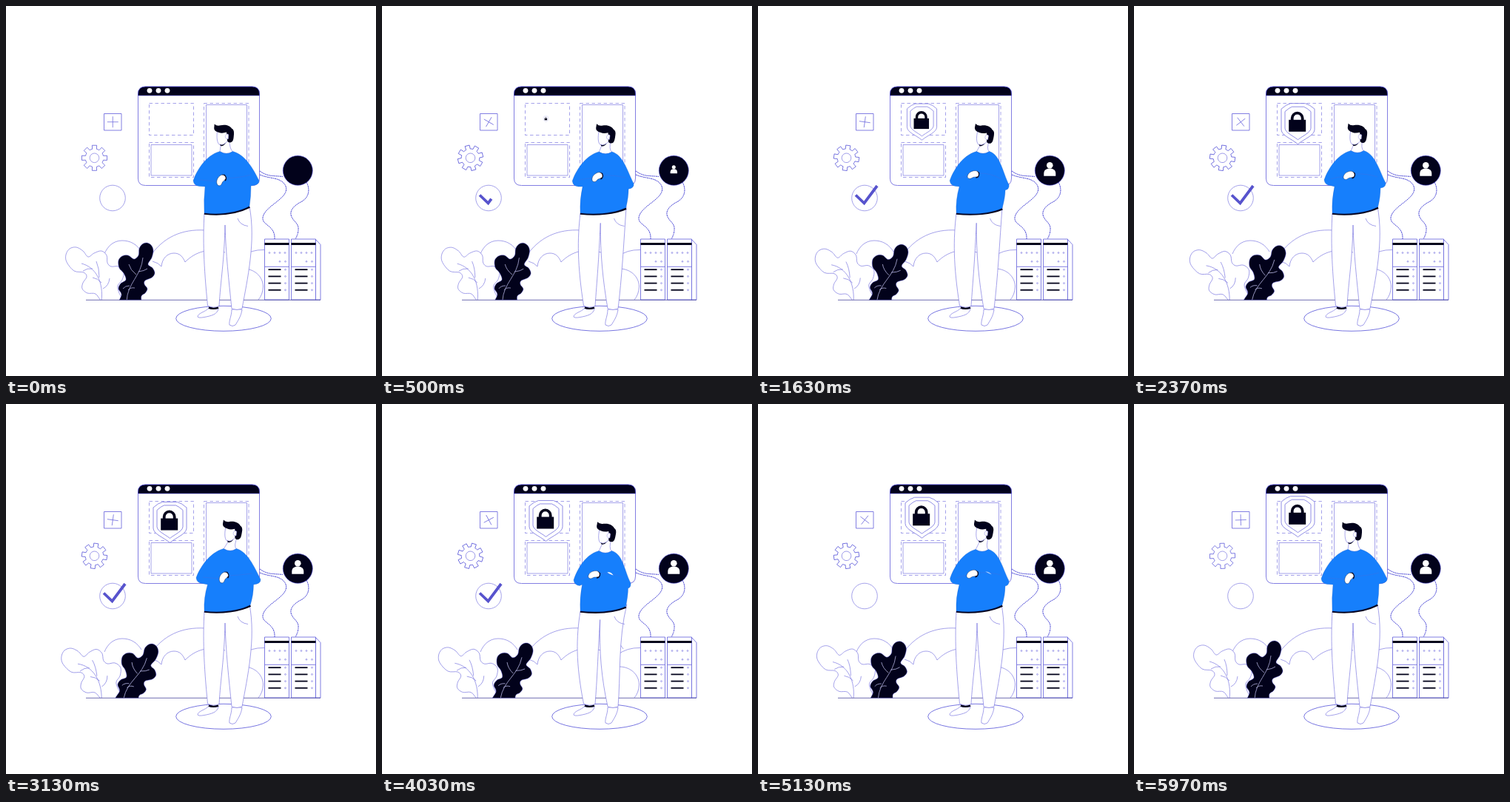
An HTML page with a canvas for the animation above (6 s loop, 500 px wide and 500 px high).

```html
<!DOCTYPE html>
<html lang="en">
<head>
<meta charset="utf-8">
<title>Secure server</title>
<style>
html, body { margin: 0; width: 100%; height: 100%; overflow: hidden; background: #fff; }
canvas { display: block; width: 100%; height: 100%; }
</style>
</head>
<body>
<canvas id="stage"></canvas>
<script>
const LOOP = 6000, TAU = Math.PI * 2;
const INK = '#02021b', LINE = '#7470df', WIRE = '#4a47d6', BLUE = '#167ffc', WHITE = '#fff';
const canvas = document.getElementById('stage');
const ctx = canvas.getContext('2d');
const ratio = window.devicePixelRatio || 1;
canvas.width = canvas.height = 500 * ratio;

const clamp = v => Math.max(0, Math.min(1, v));
const smooth = v => { v = clamp(v); return v * v * (3 - 2 * v); };
const span = (t, a, b) => clamp((t - a) / (b - a));

// Body pose: one value per time, the last returns to the first.
const TIMES = [0, 970, 2370, 3130, 4030, 5130, LOOP];
const POSE = {
  headX: [0, 14, 7, 11, 8, 10],
  headY: [0, 1, 0, -2, 1, -2],
  tilt: [0, .13, .06, .08, .1, .08],
  neck: [0, 8, 4, 5, 4, 5],
  neckY: [0, 1, -1, -1, 2, 0],
  leftX: [253, 261, 257, 257, 259, 259.5],
  leftY: [238, 239, 237, 237, 240, 238],
  rightX: [342, 338.5, 340, 344, 336, 339],
  rightY: [237, 245, 240, 238, 243, 240],
  side: [0, 4, 2, 3.5, 1.5, 3],
  hem: [0, 4, 1, 1, 3, 1],
  handX: [291, 291.5, 291, 294.5, 287, 290],
  handY: [235, 227.5, 229, 234, 231, 230],
  turn: [-.6, .1, 0, -.6, .1, 0],
  cuff: [0, 0, 0, 0, 1, .6],
  legs: [0, 1, 0, 0, .9, 0]
};

function poseAt(t) {
  let i = 0;
  while (i < TIMES.length - 2 && t >= TIMES[i + 1]) i++;
  const k = smooth(span(t, TIMES[i], TIMES[i + 1]));
  const pose = {};
  for (const name in POSE) {
    const v = POSE[name];
    pose[name] = v[i] + (v[(i + 1) % v.length] - v[i]) * k;
  }
  return pose;
}

function paint(path, fill, stroke, width = .65) {
  if (typeof path === 'string') path = new Path2D(path);
  if (fill) { ctx.fillStyle = fill; ctx.fill(path); }
  if (stroke) { ctx.strokeStyle = stroke; ctx.lineWidth = width; ctx.stroke(path); }
}

function circle(x, y, r, fill, stroke, width) {
  const p = new Path2D();
  p.arc(x, y, r, 0, TAU);
  paint(p, fill, stroke, width);
}

function box(x, y, w, h, fill, stroke, width) {
  const p = new Path2D();
  p.rect(x, y, w, h);
  paint(p, fill, stroke, width);
}

function dashed(draw, ...pattern) {
  ctx.setLineDash(pattern);
  draw();
  ctx.setLineDash([]);
}

function at(x, y, angle, scale, draw) {
  ctx.save();
  ctx.translate(x, y);
  ctx.rotate(angle);
  ctx.scale(scale, scale);
  draw();
  ctx.restore();
}

// Closed smooth curve through flat x, y pairs.
function blob(v) {
  const n = v.length / 2, p = new Path2D();
  const pt = i => { i = (i + n) % n; return [v[2 * i], v[2 * i + 1]]; };
  p.moveTo(v[0], v[1]);
  for (let i = 0; i < n; i++) {
    const [a, b, c, d] = [pt(i - 1), pt(i), pt(i + 1), pt(i + 2)];
    p.bezierCurveTo(b[0] + (c[0] - a[0]) / 6, b[1] + (c[1] - a[1]) / 6,
      c[0] - (d[0] - b[0]) / 6, c[1] - (d[1] - b[1]) / 6, c[0], c[1]);
  }
  return p;
}

const paleLeaf = blob([82, 346, 81, 336, 86, 328, 95, 326, 104, 331, 111, 339, 119, 334, 129, 331,
  136, 337, 137, 347, 142, 352, 152, 352, 159, 359, 157, 370, 151, 378, 153, 388, 158, 400,
  140, 406, 129, 399, 121, 389, 110, 388, 103, 382, 104, 374, 109, 366, 105, 360, 92, 358]);
const darkLeaf = blob([180, 328, 184, 322, 190, 320, 196, 323, 199, 330, 197, 340, 192, 349, 198, 354,
  201, 361, 197, 367, 188, 371, 187, 376, 191, 382, 188, 388, 183, 392, 180, 404,
  153, 404, 156, 390, 152, 382, 155, 375, 162, 370, 159, 361, 153, 354, 152, 344, 157, 338,
  165, 337, 173, 342, 179, 337]);
const gear = (() => {
  const p = new Path2D(), inner = 12.3, outer = 17.3;
  const put = (r, a) => p.lineTo(r * Math.cos(a), r * Math.sin(a));
  for (let i = 0; i < 8; i++) {
    const a = i * TAU / 8;
    put(inner, a - .24); put(outer, a - .18); put(outer, a + .18); put(inner, a + .24);
    p.arc(0, 0, inner, a + .24, a + TAU / 8 - .24);
  }
  p.closePath();
  return p;
})();

function clouds() {
  paint('M133 335C137 325 145 317 157 317C168 317 177 322 183 332', null, LINE);
  paint('M195 338C212 313 237 301 269 303C300 304 318 318 326 331', null, LINE);
  paint('M198 345Q206 347 210 352C211 341 218 334 227 334C235 334 239 339 242 346C257 331 275 327 296 333', null, LINE);
  paint('M318 339Q331 329 349 329.5', null, LINE);
  paint('M318 355C335 354 347 365 347.5 379Q347 390 341 397', null, LINE);
}

function browserWindow() {
  paint('M178.5 233V119Q178.5 109 188.5 109H332.5Q342.5 109 342.5 119V233Q342.5 242.5 332.5 242.5H188.5Q178.5 242.5 178.5 233Z', WHITE, LINE, .9);
  paint('M178.5 121V119Q178.5 109 188.5 109H332.5Q342.5 109 342.5 119V121Z', INK, WIRE, .6);
  for (const x of [194, 206, 218]) circle(x, 114.3, 3.4, WHITE);
  dashed(() => {
    box(193.5, 131.5, 60, 43, null, LINE);
    box(193.5, 184.5, 60, 47, null, LINE);
    box(267.5, 131.5, 60.5, 100, null, LINE);
  }, 4.5, 3.5);
  box(196, 187.5, 55, 41.5, null, LINE);
  box(270.5, 133.5, 55, 95.5, null, LINE);
}

function shield(t, wave) {
  at(221.5, 152.2 + 7.8 * wave, 0, smooth(t / 2050), () => {
    paint('M-10 -27.5H10Q16 -26 22.5 -20V8C22 16 9 20 0 27.5C-9 20 -22 16 -22.5 8V-20Q-16 -26 -10 -27.5Z', WHITE, LINE, .8);
    paint('M-8 -23H8Q12 -21.5 17.5 -16.5V6C17 12 7 16 0 21.5C-7 16 -17 12 -17.5 6V-16.5Q-12 -21.5 -8 -23Z', WHITE, LINE, .8);
    paint('M-7.8 -4V-7.5A7 7 0 0 1 6.2 -7.5V-4', null, INK, 3.8);
    box(-12.3, -5.4, 23, 16, INK);
  });
}

function icons(t) {
  const spin = t / LOOP * TAU;
  box(132.5, 145.5, 23.5, 22.5, WHITE, LINE, .9);
  at(144.3, 156.7, spin, 1, () => paint('M-7.5 0H7.5M0 -7.5V7.5', null, LINE, .8));
  at(119.5, 205.3, spin, 1, () => {
    paint(gear, WHITE, WIRE, .7);
    circle(0, 0, 6.3, null, LINE);
  });
  circle(144, 259.5, 17.3, WHITE, LINE);
  const shown = smooth(span(t, 150, 850)) * (1 - smooth(span(t, 4350, 5000)));
  if (shown > 0) {
    const length = 46;
    dashed(() => paint('M132 255.5L143.5 266.5L161 243', null, '#5753cd', 3.8), length * shown, length * 2);
  }
}

// Sways a drawing made in stage coordinates about a point.
function sway(x, y, angle, draw) {
  at(x, y, angle, 1, () => {
    ctx.translate(-x, -y);
    draw();
  });
}

function plants(wave) {
  ctx.save();
  ctx.beginPath();
  ctx.rect(0, 0, 500, 397.3);
  ctx.clip();
  sway(130, 397, -.105 * wave, () => {
    paint(paleLeaf, WHITE, LINE);
    paint('M129 399C132 374 122 353 102 348M126 367Q126 354 122 345M117 355Q110 354 104 358M131 382Q139 378 140 368M129 374Q124 368 117 367', null, LINE);
  });
  sway(168, 374, .165 * wave, () => {
    paint(darkLeaf, INK, WIRE, .4);
    paint('M163 399C164 374 183 365 185 340M176 363Q168 357 166 349M179 359Q187 358 191 355M167 378Q161 378 158 382M165 384Q168 380 174 381', null, '#c9c8f4', .7);
  });
  ctx.restore();
}

function server(x) {
  box(x, 315, 33, 82, WHITE, WIRE, .7);
  box(x, 320, 33, 3, INK);
  for (const dx of [6.5, 13.5, 20.5, 27.5]) circle(x + dx, 333.5, .9, null, LINE);
  for (const dx of [20.5, 28]) circle(x + dx, 345.3, .9, null, LINE);
  paint(`M${x} 352.3H${x + 33}`, null, LINE, .9);
  for (let i = 0; i < 4; i++) {
    const y = 356.2 + i * 9.2;
    box(x + 5, y - .9, 17, 1.8, INK);
    circle(x + 28, y, .9, null, LINE);
  }
}

function network(t) {
  dashed(() => {
    paint('M343 223C354 231 361 229 374 230.5', null, WIRE, 1);
    paint('M343 228C352 232 362 232 369 235C378 239 380 246 378 251C374 263 349 272 347 286C346 297 364 296 363 315', null, WIRE, 1);
    paint('M406 238C411 247 410 258 400 264C390 269 384 275 385 282C387 291 396 293 395 302Q395 308 391 315', null, WIRE, 1);
  }, 2, .6);
  paint('M418 315L425 322.5V397H418Z', WHITE, WIRE, .7);
  server(349.5);
  server(385.5);
  circle(394.3, 222.3, 20, INK, WIRE, .6);
  at(394.3, 221.5, 0, smooth(t / 900), () => {
    circle(0, -6.3, 4.3, WHITE);
    paint('M-8 8.3V5C-8 0 -4.5 -2 0 -2C4.5 -2 8 0 8 5V8.3Z', WHITE);
  });
}

function legs(p) {
  const k = p.legs;
  // Shoes
  paint('M273 409C270 413 259 415 259 420Q260 422 268 420.5C276 419 286 417 287 409Z', WHITE, LINE);
  paint('M305 410C305 419 301 425 302 431Q306 434 310 431C313 426 318 419 319 410Z', WHITE, LINE);
  paint('M274 407.5Q280 410 287 407.5', null, INK, 2.6);
  // Trousers
  const crotch = 296 - k * 1.5;
  paint(`M268 280C${266 - k * 4} 315 ${267 - k * 6} 350 272.5 405Q280 409 288 405.5
    C${290 + k} 370 ${295 - k * 4} 345 ${crotch} ${296 - k * 5}
    C${297 - k * 4} 335 ${301 - k * 5} 370 305 409Q312 412 319 409
    C${326 - k * 4} 370 ${338 - k * 21} 318 ${329 + k * 2} 271Z`, WHITE, LINE);
  paint(`M${313 + k} 287Q${316 + k} 296 ${327 + k} 297.5`, null, LINE);
}

function torso(p) {
  const n = p.neck, s = p.side, ny = p.neckY;
  const lx = p.leftX, ly = p.leftY, rx = p.rightX, ry = p.rightY;
  const hemX = 329 + s / 3, hemY = 271 + p.hem;
  const hem = `C${314 + s / 2} ${278.5 + p.hem / 2} 292 282.5 268 279.8`;
  paint(`M${hemX} ${hemY}${hem}`, null, INK, 4);
  paint(`M${289 + n} ${196.5 + ny}Q${298 + n} ${202 + ny} ${306.5 + n} ${196.5 + ny}
    C${323 + n * .7} ${201 + ny} ${rx - 9} ${ry - 19} ${rx} ${ry - 1}
    Q${rx + .5} ${ry + 5} ${331 + s} ${ry + 6}
    Q${331 + s} 258 ${hemX} ${hemY - .5}
    ${hem}
    Q267 262 ${269 + s} 244
    L${lx + 8} ${ly + 5.5}
    Q${lx + 1} ${ly + 5} ${lx} ${ly - 2}
    C${lx + 4} ${ly - 14} ${269 + n} ${202 + ny} ${289 + n} ${196.5 + ny}Z`, BLUE, '#1558c8', .3);
  // Folded forearms
  paint(`M${lx + 9} ${ly - 3}Q${lx + 20} ${p.handY + 1} ${p.handX - 6} ${p.handY + 2}
    M${p.handX + 6} ${p.handY - 2}Q${rx - 25} ${p.handY - 3} ${rx - 11} ${ry - 9}`, null, '#3474ea', .6);
  at(p.handX, p.handY, p.turn, 1.12, () => {
    paint('M3 4Q8 3 7 -3L4 -5Z', INK);
    paint('M-7 1C-6 -3 -1 -5.5 3 -5C6 -4 7 -1 5.5 1.5C3 3 0 2 -2 4C-5 6 -8 4 -7 1Z', WHITE, INK, .3);
  });
  if (p.cuff > .02) {
    ctx.globalAlpha = p.cuff;
    at(p.handX + 21.5, p.handY - 1.8, .15, 1, () =>
      paint(`M-4.5 -1Q0 ${-1 - 2.2 * p.cuff} 4.5 1.6Q0 ${1.2 * p.cuff} -4.5 -1Z`, WHITE));
    ctx.globalAlpha = 1;
  }
}

function head(p) {
  const n = p.neck, ny = p.neckY;
  const x = p.headX, y = p.headY;
  paint(`M${290.5 + x} ${186 + y}L${289 + n} ${197 + ny}Q${298 + n} ${202 + ny} ${306.5 + n} ${197 + ny}
    Q${302 + n} ${193 + ny} ${302 + x} ${181 + y}Z`, WHITE, LINE, .6);
  at(294 + x, 174 + y, p.tilt, 1, () => {
    paint('M-8.5 -5C-9.5 3 -9 10 -6 13Q-2 15 3 11L8 5L6 -6Z', WHITE, LINE, .6);
    paint('M-5 13Q-1 15 3 11Q0 16 -4 15Z', INK);
    paint('M-12.3 -14.5Q-9 -11.3 -4 -12.8C3 -14.5 9 -12 11 -8.5Q14.5 -7 14 -1C13.5 5 13.5 10 9 10.5Q5 10.5 5 7L4 -3.5Q-2 -1.5 -6 -3Q-13 -4.5 -12.8 -9Z', INK);
    paint('M6.5 5.5C3 6.5 1.5 3 2.8 .5Q5 -2.5 6.8 0Z', WHITE, LINE, .4);
  });
}

function person(p) {
  const ring = new Path2D();
  ring.ellipse(294, 422.3, 64.3, 17, 0, 0, TAU);
  paint(ring, WHITE, WIRE, .75);
  legs(p);
  head(p);
  torso(p);
}

function draw(t) {
  const wave = (1 - Math.cos(t / LOOP * TAU)) / 2;
  ctx.setTransform(ratio, 0, 0, ratio, 0, 0);
  ctx.fillStyle = WHITE;
  ctx.fillRect(0, 0, 500, 500);
  clouds();
  browserWindow();
  shield(t, wave);
  icons(t);
  plants(wave);
  network(t);
  paint('M108 397.3H425', null, '#4b489f', .8);
  person(poseAt(t));
}

const start = performance.now();
function tick() {
  draw((performance.now() - start) % LOOP);
  requestAnimationFrame(tick);
}
tick();
</script>
</body>
</html>
```
